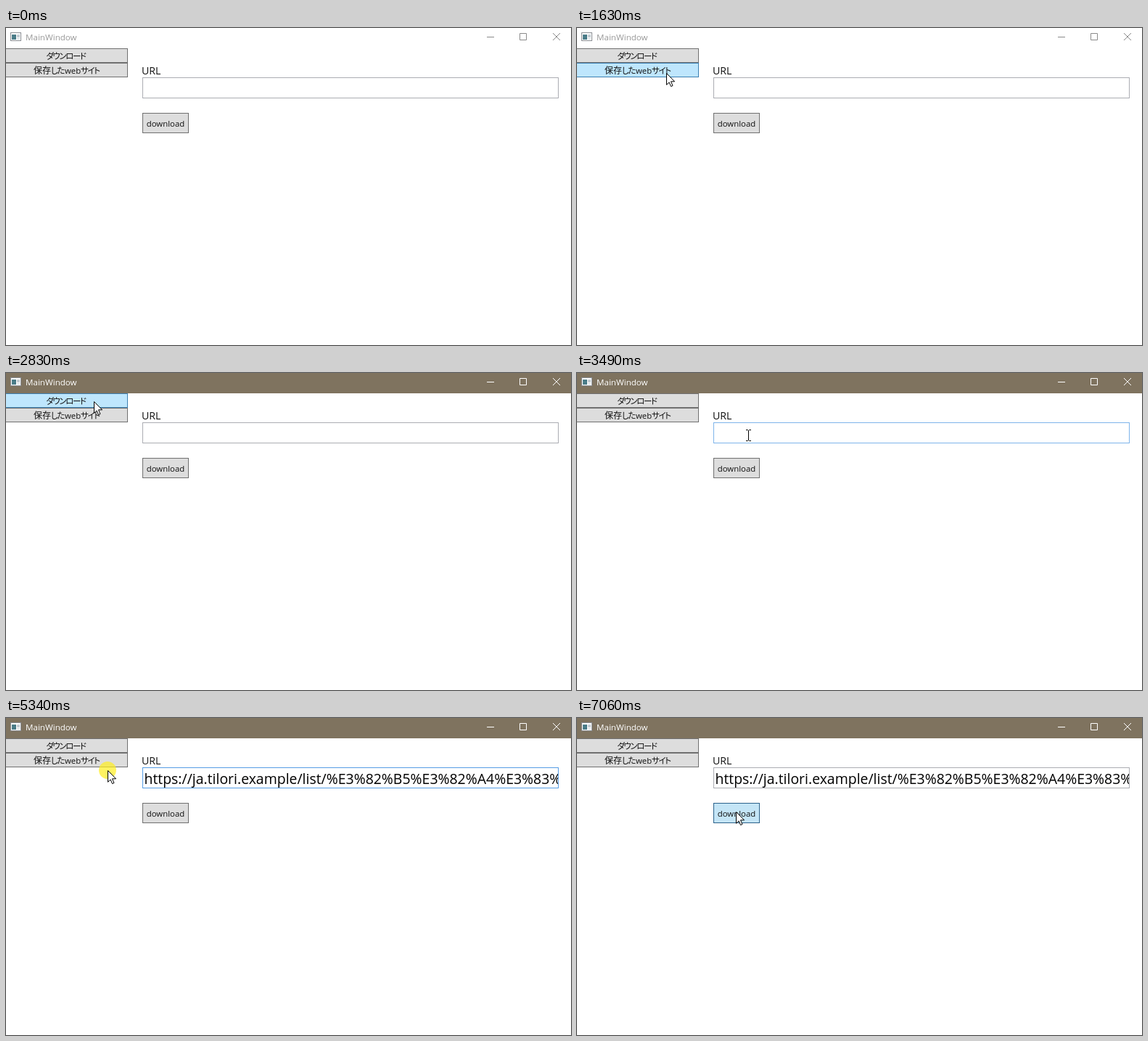
These frames come from a looping animation (779 px wide and 437 px high, 8000 ms). An HTML page:

```html
<!DOCTYPE html>
<html lang="ja">
<head>
<meta charset="utf-8">
<title>MainWindow</title>
<style>
  html, body { margin: 0; width: 100%; height: 100%; overflow: hidden; background: #fff; }
  svg { display: block; width: 779px; height: 437px; }
  text { font-family: "Open Sans", "Noto Sans", sans-serif; fill: #111; }
  .small { font-size: 11.4px; }
  .jp { font: 12px "Noto Sans CJK JP", "Noto Sans CJK", sans-serif; }
  .kana { font-size: 11.5px; font-feature-settings: "palt"; letter-spacing: -1.4px; }
  .btn rect { fill: #ddd; stroke: #707070; }
  .btn.hover rect { fill: #bee6fd; stroke: #3c7fb1; }
  .btn.down rect { fill: #c4e5f6; stroke: #2c628b; }
  #bar { fill: #fff; }
  #bar + text { font-size: 11.6px; fill: #999; }
  #sys { fill: none; stroke: #8a8a8a; }
  .active #bar { fill: #7f735f; }
  .active #bar + text { fill: #fff; }
  .active #sys { stroke: #fff; }
  #box { fill: #fff; stroke: #abadb3; }
  #box.hover { stroke: #7eb4ea; }
  #box.focus { stroke: #569de5; }
  #url { font-size: 19.45px; fill: #000; }
</style>
</head>
<body>
<svg id="win" viewBox="0 0 779 437">
  <defs><clipPath id="inner"><rect x="189" y="69" width="572" height="27"/></clipPath></defs>

  <rect id="bar" width="779" height="28"/>
  <text x="27" y="17">MainWindow</text>
  <g shape-rendering="crispEdges">
    <rect x="6.5" y="6.5" width="14" height="11" fill="#fff" stroke="#8b8f94"/>
    <rect x="8" y="9" width="6" height="7" fill="#4a7c88"/>
    <rect x="15" y="9" width="4" height="4" fill="#c3ccd2"/>
    <rect x="15" y="14" width="4" height="2" fill="#dfe4e8"/>
  </g>
  <g id="sys">
    <path d="M663 12.5h10M708.5 7.5h9v9h-9z"/>
    <path d="M754 7l10 10M764 7l-10 10"/>
  </g>

  <path id="list" d="M779 28.5H168.5V437" fill="none" stroke="#abadb3"/>

  <g id="form">
    <text x="187" y="64" font-size="14.2">URL</text>
    <rect id="box" x="188.5" y="68.5" width="573" height="28"/>
    <g clip-path="url(#inner)">
      <text id="url" y="91"></text>
      <path id="caret" d="M.5 71v24" stroke="#000"/>
    </g>
    <g class="btn" id="load">
      <rect x="188.5" y="117.5" width="63" height="27"/>
      <text class="small" x="220" y="136" text-anchor="middle">download</text>
    </g>
  </g>

  <g class="btn" id="nav1">
    <rect x="-.5" y="28.5" width="168" height="19"/>
    <text class="jp kana" x="82.5" y="42.5" text-anchor="middle">ダウンロード</text>
  </g>
  <g class="btn" id="nav2">
    <rect x="-.5" y="48.5" width="168" height="19"/>
    <text class="jp" x="38" y="62.5">保存</text>
    <text class="jp kana" x="62" y="62.5">した</text>
    <text class="small" x="81" y="62.5">web</text>
    <text class="jp kana" x="103" y="62.5">サイト</text>
  </g>

  <g id="mouse">
    <circle id="ring" r="12" fill="#ffee20" opacity=".7"/>
    <path id="arrow" d="M.5 .5V16.3L4.1 12.9L6.6 18.6L9 17.5L6.5 11.8H11.6Z" fill="#fff" stroke="#000"/>
    <path id="beam" d="M-3 -7.5h2.5l1 1l1 -1h2.5M.5 -7V7M-3 7.5h2.5l1 -1l1 1h2.5" fill="none" stroke="#000"/>
  </g>
</svg>
<script>
const LOOP = 8000, STEP = 66;
const PASTE = 4350, BLINK = 4810;
const $ = id => document.getElementById(id);
const url = 'https://ja.tilori.example/list/' + encodeURIComponent('サインページ');

// The pointer glides to each stop in turn; a higher pull brakes harder.
const entry = { x: 690, y: 430 };
const drag = { from: 5280, to: 5470, x: 126, y: 70, pull: 3 };
const stops = [
  { from: 310, to: 670, x: 372, y: 187 },
  { from: 735, to: 1100, x: 222, y: 114 },
  { from: 1170, to: 1630, x: 123, y: 62 },
  { from: 2300, to: 2690, x: 121, y: 39 },
  { from: 3090, to: 3490, x: 236, y: 86 },
  drag,
  { from: 6070, to: 6270, x: 122, y: 3 },
  { from: 6335, to: 6600, x: 227, y: 154 },
  { from: 6665, to: 6800, x: 219, y: 129 }
];

const span = (down, up) => ({ down, up });
const click = {
  saved: span(1770, 1900),
  back: span(2690, 2830),
  field: span(3820, 3950),
  drag: span(5140, 5870),
  load: span(6930, 7060)
};

const within = (t, a, b) => t >= a && t < b;
const show = (id, on) => { $(id).style.display = on ? '' : 'none'; };

function pointer(t) {
  const i = stops.findLastIndex(s => s.from <= t);
  if (i < 0) return null;
  const a = stops[i - 1] || entry, b = stops[i];
  const count = Math.round((b.to - b.from) / STEP) + 1;
  const step = Math.floor((t - b.from + 6) / STEP) + 1;
  const u = 1 - (1 - Math.min(1, step / count)) ** (b.pull || 1);
  const mix = k => Math.round(a[k] + (b[k] - a[k]) * u);
  return { x: mix('x'), y: mix('y') };
}

function over(pos, x, y, w, h) {
  return !!pos && within(pos.x, x, x + w) && within(pos.y, y, y + h);
}

function button(id, hover, down) {
  $(id).classList.toggle('hover', hover);
  $(id).classList.toggle('down', down);
}

function draw(t) {
  const pos = pointer(t);
  const held = Object.values(click).some(c => within(t, c.down, c.up));
  const listed = within(t, click.saved.up, click.back.up);
  const inBox = !listed && over(pos, 188, 68, 574, 29);
  const on1 = over(pos, 0, 28, 168, 20);
  const on2 = over(pos, 0, 48, 168, 20);

  $('win').classList.toggle('active', t >= click.saved.down);
  show('list', listed);
  show('form', !listed);
  button('nav1', on1, on1 && held);
  button('nav2', on2, on2 && held);
  button('load', over(pos, 188, 117, 64, 28), t >= click.load.down);

  $('box').classList.toggle('hover', inBox);
  $('box').classList.toggle('focus', within(t, click.field.down, click.load.down));

  const atEnd = within(t, PASTE, drag.from);
  const field = $('url');
  field.textContent = t < PASTE ? '' : url;
  field.setAttribute('x', atEnd ? 759 : 190.5);
  field.setAttribute('text-anchor', atEnd ? 'end' : 'start');
  show('caret', within(t, click.field.down, BLINK));
  $('caret').setAttribute('transform', `translate(${atEnd ? 759 : 191})`);

  show('mouse', pos);
  if (pos) $('mouse').setAttribute('transform', `translate(${pos.x} ${pos.y})`);
  show('ring', held);
  show('arrow', !inBox);
  show('beam', inBox);
}

function tick() {
  draw(performance.now() % LOOP);
  requestAnimationFrame(tick);
}
tick();
</script>
</body>
</html>
```
